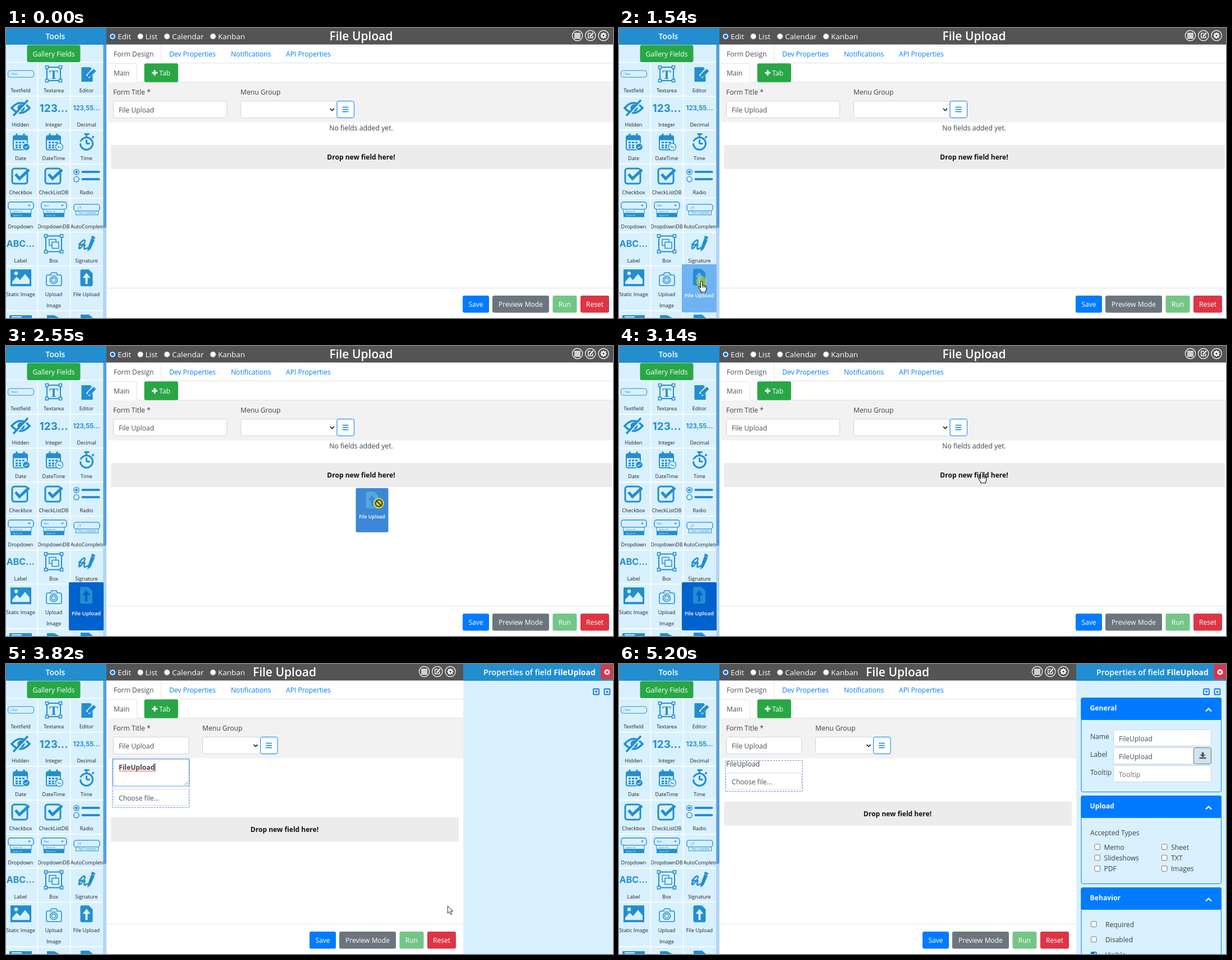
Write an HTML page that moves like this. It is 1082 px wide and 518 px high and loops after 5400 ms.

```html
<!DOCTYPE html>
<html lang="en">
<head>
<meta charset="utf-8">
<title>Form designer</title>
<style>
html, body { margin: 0; width: 100%; height: 100%; overflow: hidden; background: #fff; }
svg { display: block; width: 1082px; height: 518px; font: 12.1px "Open Sans", "Noto Sans", sans-serif; }
.num { font-family: Inter, sans-serif; font-weight: 700; }
</style>
</head>
<body>
<svg id="stage" viewBox="0 0 1082 518"></svg>
<script>
const INK = '#228ed0', PALE = '#d9f1ff', BLUE = '#007bff', GREEN = '#28a745', RED = '#dc3545', GRAY = '#6c757d';
const DARK = '#3a3f44', LINE = '#ced4da';

// Drawing helpers
const rect = (x, y, w, h, fill, more = '') => `<rect x="${x}" y="${y}" width="${w}" height="${h}" fill="${fill}" ${more}/>`;
const path = (d, fill, stroke = 'none', width = 1, more = '') =>
  `<path d="${d}" fill="${fill}" stroke="${stroke}" stroke-width="${width}" ${more}/>`;
const circle = (x, y, r, fill, stroke = 'none', width = 1) =>
  `<circle cx="${x}" cy="${y}" r="${r}" fill="${fill}" stroke="${stroke}" stroke-width="${width}"/>`;
const text = (x, y, s, fill = DARK, size = 12.1, more = '') =>
  `<text x="${x}" y="${y}" fill="${fill}" font-size="${size}" ${more}>${s}</text>`;
const MID = 'text-anchor="middle"', BOLD = 'font-weight="700"', SEMI = 'font-weight="600"';
const group = (x, y, s, more = '') => `<g transform="translate(${x} ${y})" ${more}>${s}</g>`;
const line = (d, color, width = 1, more = '') => path(d, 'none', color, width, more);
const box = (x, y, w, h, color = LINE, fill = '#fff') => rect(x + .5, y + .5, w - 1, h - 1, fill, `stroke="${color}" rx="3"`);
const button = (x, y, w, h, s, fill) => rect(x, y, w, h, fill, 'rx="3"') + text(x + w / 2, y + h / 2 + 5, s, '#fff', 12.1, MID);

// Sidebar icons, centred on 0,0
const corners = r => [[-r, -r], [r, -r], [-r, r], [r, r]].map(([x, y]) => rect(x - 2.5, y - 2.5, 5, 5, PALE, `stroke="${INK}" stroke-width="1.6"`)).join('');
const frame = r => rect(-r, -r, 2 * r, 2 * r, 'none', `stroke="${INK}" stroke-width="2"`) + corners(r);
const number = (s, size) => text(0, size * .36, s, INK, size, MID + ' class="num"');
const calendar = hand => rect(-13, -11, 25, 25, 'none', `stroke="${INK}" stroke-width="2" rx="3"`) +
  rect(-13, -11, 25, 8, INK) + line('M-7-15v7M6-15v7', INK, 3) +
  line('M-9 1h18M-9 6h18M-9 10h10', INK, 3, 'stroke-dasharray="4 2"') +
  circle(10, 9, 6.5, hand ? PALE : INK, hand ? INK : PALE, 1.3) + line(hand ? 'M7 8l3 2h3' : 'M7 9l2 2 4-4', hand ? INK : PALE, 1.3);
const check = rect(-15, -13, 27, 27, 'none', `stroke="${INK}" stroke-width="3" rx="4"`) + line('M-9-3l7 8L15-11', INK, 5);
const dropdown = s => rect(-22, -14, 45, 13, PALE, `stroke="${INK}" stroke-width="1.4" rx="4"`) +
  rect(-18, -1, 37, 7, PALE, `stroke="${INK}"`) + rect(-18, 6, 37, 7, INK) + path('M13-9h5l-2.5 3z', INK) +
  text(-18, -6, s, INK, 5) + text(-14, 4, 'Option A', INK, 4) + text(-14, 11, 'Option B', PALE, 4);
const upload = path('M-11-12q0-3 3-3H4L11-8V12q0 3-3 3H-8q-3 0-3-3zM0-9L-7 0h5V11h4V0h5z', INK, 'none', 1, 'fill-rule="evenodd"');
const pen = 'M3 7L9-10l5 3L7 9l-5 4z';
const icons = [
  rect(-22.5, -6, 46, 12, PALE, `stroke="${INK}" rx="4"`) + text(-19, 2, '|Text', INK, 5.5),
  frame(12) + text(0, 9, 'T', INK, 24, MID + ' font-family="Liberation Serif, serif" font-weight="700"'),
  path('M-9-12H7l4 5V14H-9z', INK) + line('M2 5L15-9', PALE, 8) + path('M1 6l2-6L13-9l4 4L7 5z', INK),
  path('M-16 0Q-8-9 0-9T16 0Q8 9 0 9T-16 0z', 'none', INK, 3.6) + circle(1, 0, 6.5, INK) + line('M-10 15L16-14', PALE, 2.5) + line('M-13 14L13-14', INK, 3.5),
  number('123...', 19), number('123,55...', 11.3),
  calendar(false), calendar(true),
  circle(0, 3, 11, 'none', INK, 3) + line('M-4-14H5M0-14v6M10-7l3-3M0 3V-4M0 3h6', INK, 3) + line('M-13-4l-1 7 7-4', PALE, 2.5),
  check, check,
  [-7, 6].map(y => circle(-18, y, 4.7, 'none', INK, 1.4) + line(`M-7 ${y}H22`, INK, 4, 'stroke-linecap="round"')).join('') + circle(-18, -7, 2.4, INK),
  dropdown(''), dropdown('Text'),
  rect(-22.5, -10, 46, 12, PALE, `stroke="${INK}" stroke-width="1.3" rx="4"`) + rect(-19, 2, 40, 7, PALE, `stroke="${INK}"`) +
    text(-17, -1, '|T', INK, 7) + text(-15, 7.5, 'Text complete', INK, 5),
  number('ABC...', 16),
  frame(14) + rect(-8, -8, 12, 11, 'none', `stroke="${INK}" stroke-width="1.5"`) + rect(-3, -3, 12, 11, PALE, `stroke="${INK}" stroke-width="1.5"`),
  line('M-14 2Q-5-9-3-6T-10 7Q-15 11-13 5T-3 2Q-6 11-2 9T3 7', INK, 2.6) + path(pen, INK, INK) + line('M9-13l6 3', INK, 4),
  rect(-18, -15, 37, 30, INK) + path('M-15 11v-4l8-9 6 6L8-7l8 10v8z', PALE) + circle(-8, -8, 3.2, PALE),
  group(0, 3, rect(-13, -8, 27, 19, 'none', `stroke="${INK}" stroke-width="1.6" rx="3"`) + path('M-6-8l2-4H5l2 4', PALE, INK, 1.6) +
    circle(0, 1, 6.5, 'none', INK, 1.6) + circle(0, 1, 3.5, 'none', INK, 1.2)),
  upload
];
const names = ('Textfield,Textarea,Editor,Hidden,Integer,Decimal,Date,DateTime,Time,Checkbox,CheckListDB,Radio,' +
  'Dropdown,DropdownDB,AutoComplete,Label,Box,Signature,Static Image,Upload,File Upload').split(',');

function sidebar() {
  let s = rect(0, 0, 179, 518, PALE);
  const centers = [26, 85, 143.5];
  names.forEach((name, i) => {
    const x = centers[i % 3], y = 82 + 60.7 * Math.floor(i / 3), wide = name === 'AutoComplete';
    s += group(x, y, icons[i]) + text(wide ? 115 : x, y + 33, name, '#222', 9.1, wide ? '' : MID);
  });
  s += text(85, 499, 'Image', '#222', 9.1, MID);
  s += rect(6, 513, 40, 5, INK) + path('M73 513h13l9 5H73z', INK) + path('M133 518v-6h15l7 6z', INK) + line('M10 516h18', PALE, 2);
  for (const y of [30.5, 61, 121.7, 182.4, 243.1, 303.8, 364.5, 425.2, 505]) s += line(`M0 ${y}H173`, '#fff', 1.6);
  s += line('M56.5 61V518M114.5 61V518', '#fff', 1.6) + button(37.5, 30.5, 95, 30.5, 'Gallery Fields', GREEN);
  s += rect(173, 29, 6, 489, '#b3d6f2') + rect(173.5, 29, 5.5, 328, '#579fda', 'rx="2"');
  return s + rect(0, 0, 179, 30, INK) + text(88, 20, 'Tools', '#fff', 14, MID + ' ' + SEMI);
}

const roundIcons = x => [0, 23.3, 46.6].map(dx => circle(x + dx, 13.5, 9.2, 'none', '#fff', 1.2)).join('') +
  line(`M${x - 5.5} 9.8h11m-11 2.7h11m-11 2.7h11m-11 2.7h11`, '#fff', 2) +
  group(x + 23.3, 13.5, line('M1-4h-5v8h8V0', '#fff', 1.4) + line('M-1 2L5-5', '#fff', 2.2)) +
  group(x + 46.6, 13.5, circle(0, 0, 3, 'none', '#fff', 2.4) + line('M0-5.5V-3M0 3v2.5M-5.5 0H-3M3 0h2.5M-4-4l2 2M2 2l2 2M4-4L2-2M-2 2l-2 2', '#fff', 2));

// d: how far the page centre has moved left to make room for the panel
const SHIFT = 136.5;
function page(d) {
  const right = d ? 815 : 1082, w = d ? 135 : 203, menu = d ? 350 : 418, open = d ? 453 : 589.5;
  let s = rect(179, 0, right - 179, 518, '#fff') + rect(179, 0, right - 179, 29.5, '#545454');
  [['Edit', 190], ['List', 239.5], ['Calendar', 287], ['Kanban', 369]].forEach(([name, x], i) => {
    s += circle(x, 15, 5.2, '#fff', i ? '#777' : '#0b6fd8', 1) + text(x + 9, 20, name, '#fff', 13.5);
    if (!i) s += circle(x, 15, 3, '#0b6fd8');
  });
  s += text(633 - d, 22, 'File Upload', '#fff', 21, MID + ' ' + SEMI) + roundIcons(1018.5 - 2 * d);
  s += line(`M276.5 30V62.5H${right}M233.5 96V66q0-2.5-3-2.5H182M233.5 96.5H${right}`, '#dee2e6');
  s += text(192, 51, 'Form Design', '#495057') + text(291, 51, 'Dev Properties', BLUE) + text(401, 51, 'Notifications', BLUE) +
    text(499, 51, 'API Properties', BLUE) + text(192, 85, 'Main', '#495057');
  s += rect(246.5, 63.3, 60.3, 33.5, GREEN, 'rx="3"') + line('M260 80h10M265 75v10', '#fff', 2.8) + text(273, 85, 'Tab', '#fff');
  s += rect(182, 97, right - 182, 71.5, '#f2f2f2') + text(191, 119, 'Form Title *') + text(menu, 119, 'Menu Group');
  s += box(191, 130, w, 31) + text(201, 151, 'File Upload', '#495057') + box(menu, 130, open - menu + 1, 31) +
    line(`M${open - 11.5} 144l3.5 3.5 3.5-3.5`, '#333', 1.8) + box(open, 130, 31.5, 31, BLUE) +
    line(`M${open + 10} 141.5h11m-11 4h11m-11 4h11`, BLUE, 1.7);
  s += line(`M179 464.5H${right}`, '#dee2e6');
  [['Save', 814, 47, BLUE], ['Preview Mode', 867, 101, GRAY], ['Run', 974.5, 43, '#73c686'], ['Reset', 1024, 51, RED]]
    .forEach(([name, x, bw, fill]) => s += button(x - 2 * d, 478, bw, 30.5, name, fill));
  return s;
}
const dropBar = (y, d) => rect(187, y, 893 - 2 * d, 43, '#ececec') +
  text(633 - d, y + 26, 'Drop new field here!', '#111', 12.05, MID + ' ' + BOLD);
const dashed = (y, h) => rect(189.5, y + .5, 137.5, h, 'none', 'stroke="#5f86d0" stroke-dasharray="3 2"');
const fileInput = y => box(191, y, 135, 30, '#d5dadf') + text(201, y + 20.5, 'Choose file...', '#495057');

const editing = rect(190, 169.5, 137, 49, '#fff', 'stroke="#bfdcff" stroke-width="2" rx="3"') + rect(191, 170, 135, 48, '#fff', 'stroke="#80bdff" rx="3"') +
  text(201, 189, 'FileUpload', '#444', 12.1, BOLD) + line('M265.5 177v15', '#222') +
  line('M201 190.5' + 'l2 1.5 2-1.5'.repeat(16), '#e03a3a', .9) + line('M318 216l6-6M321 216l3-3', '#777', .8) +
  fileInput(223) + dashed(169, 87) + dropBar(274, SHIFT);
const labelled = text(191, 183, 'FileUpload') + fileInput(194.5) + dashed(172, 55) + dropBar(245.5, SHIFT);

const panelHead = rect(815, 0, 267, 518, PALE) + rect(815, 0, 267, 30, INK) +
  text(951, 20, `Properties of field <tspan ${BOLD}>FileUpload</tspan>`, '#fff', 14.1, MID + ' ' + SEMI) +
  rect(1060, 1, 22, 26, RED, 'rx="3"') + circle(1071.5, 14.5, 5, '#fff') + line('M1069.5 12.5l4 4m0-4l-4 4', RED, 1.5);
const FOLD = '#1673dc';
const foldBox = (x, arrow) => group(x, 0, rect(-5, -5, 10, 10, 'none', `stroke="${FOLD}" stroke-width="1.8" rx="1"`) + path(arrow, FOLD));
const folds = foldBox(0, 'M-3-1.5h6L0 2z') + foldBox(19.5, 'M-3 1.5h6L0-2z');
const card = (y, h, name) => box(823.5, y, 250.5, h, BLUE, PALE) + rect(823.5, y, 250.5, 40, BLUE, 'rx="3"') +
  text(839.5, y + 23, name, '#fff', 12.2, BOLD) + line(`M1046 ${y + 24.5}l5-5 5 5`, '#fff', 2.2);
const tick = (x, y) => rect(x + .5, y - 4.5, 9.5, 9.5, '#fff', 'stroke="#777" rx="1.5"');
function cards() {
  let s = card(60, 169, 'General') + card(235, 158, 'Upload') + card(399, 130, 'Behavior');
  ['Name', 'Label', 'Tooltip'].forEach((name, i) => {
    const y = 117 + 32 * i;
    s += text(840, y + 17, name) + box(881, y, 175, 30) + text(891, y + 21, i < 2 ? 'FileUpload' : name, i < 2 ? '#495057' : GRAY);
  });
  s += box(1024, 149, 32, 30, GRAY, '#cfe3f0') + path('M1038.5 158h4v4h3l-5 5-5-5h3z', '#555') + line('M1034.5 168h12', '#555', 2.5);
  s += text(840, 306, 'Accepted Types');
  ['Memo', 'Sheet', 'Slideshows', 'TXT', 'PDF', 'Images'].forEach((name, i) => {
    const x = i % 2 ? 967 : 847.5, y = 326.5 + 19.3 * (i >> 1);
    s += tick(x, y) + text(x + 17, y + 5.3, name);
  });
  ['Required', 'Disabled', 'Visible'].forEach((name, i) => s += tick(841, 464.5 + 27.2 * i) + text(867, 470 + 27.2 * i, name));
  return s + rect(841, 514, 10.5, 10, '#0b6fd8', 'rx="1.5"') + line('M843 518l2 2.5 5-5', '#fff', 1.5);
}

const tile = (w, h, fill, size) => rect(0, 0, w, h, fill, 'rx="2"') + group(w / 2, h * .27, upload) +
  text(w / 2, h * .69, 'File Upload', '#fff', size, MID + ' ' + SEMI);
const arrow = path('M0 0V13l3-2.7 2.3 5.2 2.3-1-2.2-5H9.5z', '#fff', '#222', 1);
const hand = path('M-1.5 1.2q0-2 1.6-2T1.8 1.2V7q1.5-.8 2.5.5 1.5-.6 2.3.7 2.3-.4 2.3 2V13q0 2-1.6 4.5v1.3H-1v-1.5L-4.5 12q-1.5-2.5 0-3Q-3 8.5-1.5 11z', '#fff', '#111', 1.1) +
  line('M1.8 7v4M4.3 8v3M6.6 8.7v2.5', '#111', .8);
const noDrop = circle(0, 0, 6, 'none', '#333', 2) + line('M-4-4L4 4', '#333', 2);
const spot = (fill, opacity) => `<g opacity="${opacity}">${circle(0, 0, 9.5, fill)}</g>`;

const layer = (id, s) => `<g id="${id}">${s}</g>`;
document.getElementById('stage').innerHTML = sidebar() +
  layer('wide', page(0) + text(633, 183, 'No fields added yet.', DARK, 12.25, MID) + dropBar(209, 0)) +
  layer('narrow', page(SHIFT) + panelHead) + layer('editing', editing) + layer('labelled', labelled) +
  layer('folds', folds) + layer('cards', cards()) +
  layer('hover', group(112, 422, tile(62, 86, '#70b3f4', 9.7))) + layer('pressed', group(112, 422, tile(62, 86, '#0062cc', 9.7))) +
  layer('ghost', `<g opacity=".76">${tile(58, 79, '#0062cc', 8.7)}</g>`) +
  layer('click', spot('#e8e800', .5)) + layer('arrow', arrow) + layer('hand', hand) + layer('noDrop', spot('#f0e020', .8) + noDrop);

const el = id => document.getElementById(id);
const show = (id, on) => el(id).setAttribute('display', on ? 'inline' : 'none');
const move = (id, x, y) => el(id).setAttribute('transform', `translate(${x} ${y})`);

// Keys: [time, x, y]
const pointerKeys = [[210, 962, 505], [470, 730, 462], [740, 509, 438], [1000, 270, 448], [1140, 172, 452], [1280, 147, 453]];
const leaveKeys = [[3480, 646, 226], [3680, 708, 340], [3820, 787, 432], [4020, 854, 464], [4580, 1020, 506], [4720, 1038, 513]];
const dragKeys = [[1600, 112, 424], [1740, 165, 436], [1870, 275, 438], [2000, 425, 430], [2140, 568, 404], [2300, 615, 335],
  [2470, 627, 272], [2680, 618, 225], [2890, 608, 193]];
function at(keys, t) {
  const i = keys.findIndex(k => k[0] > t);
  if (i < 0) return keys[keys.length - 1].slice(1);
  if (!i) return keys[0].slice(1);
  const [a, b] = [keys[i - 1], keys[i]], p = (t - a[0]) / (b[0] - a[0]);
  return [a[1] + (b[1] - a[1]) * p, a[2] + (b[2] - a[2]) * p];
}

function draw(now) {
  const t = now % 5400;
  const dragging = t >= 1600 && t < 3090, opened = t >= 3270, filled = t >= 4800;
  const [gx, gy] = at(dragKeys, t);
  const [x, y] = dragging ? [gx + 41, gy + 27] : at(t < 3090 ? pointerKeys : leaveKeys, t);
  const overTile = t >= 1140 && t < 1600, overBar = dragging && y < 252;
  show('wide', !opened);
  show('narrow', opened);
  show('editing', opened && t < 5200);
  show('labelled', t >= 5200);
  show('folds', opened);
  show('cards', filled);
  show('hover', overTile);
  show('pressed', t >= 1600 && !opened);
  show('ghost', dragging);
  show('click', t >= 1480 && t < 1600 || overBar);
  show('noDrop', dragging && !overBar);
  show('hand', overTile || t >= 3090 && t < 3340);
  show('arrow', t >= 210 && t < 1140 || overBar || t >= 3340 && !filled);
  move('folds', filled ? 1047 : 1052, 49.5);
  move('ghost', gx, gy);
  for (const id of ['click', 'arrow', 'hand', 'noDrop']) move(id, x, y);
  requestAnimationFrame(draw);
}
requestAnimationFrame(draw);
</script>
</body>
</html>
```
